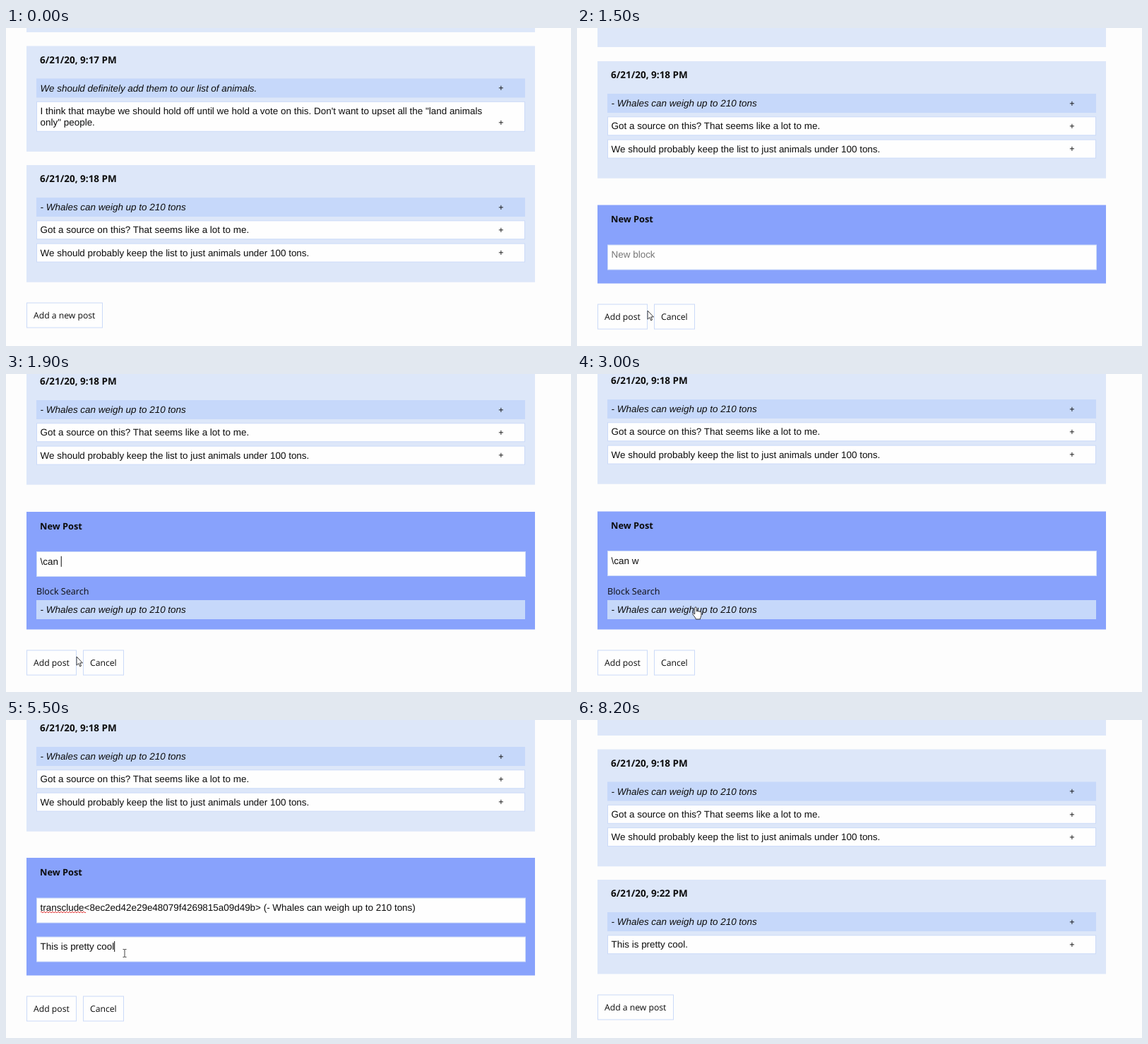
An HTML page for the animation above (8300 ms loop, 800x450 px).

```html
<!DOCTYPE html>
<html lang="en">
<head>
<meta charset="utf-8">
<title>Adding a post</title>
<style>
  html, body { margin: 0; width: 100%; height: 100%; overflow: hidden; background: #fdfdfd; }
  svg { display: block; width: 800px; height: 450px; }
  text { white-space: pre; text-rendering: geometricPrecision; fill: #0c0c0c; }
  .body { font: 13.44px "Liberation Sans", Arial, sans-serif; }
  .quote { font-style: italic; }
  .hint { fill: #757575; }
  .plus { font: 12.5px "Liberation Sans", Arial, sans-serif; text-anchor: middle; }
  .date { font: bold 13.5px "Open Sans", sans-serif; }
  .head { font: bold 12.8px "Open Sans", sans-serif; }
  .label { font: 12.6px "Open Sans", sans-serif; }
  .btn { font: 12.2px "Open Sans", sans-serif; }
</style>
</head>
<body>
<svg id="stage" viewBox="0 0 800 450"></svg>
<script>
const LOOP = 8300;
const PALE = '#dde7f9', QUOTE = '#c6d8fa', EDGE = '#cbdaf8', BLUE = '#88a2fc';
const stage = document.getElementById('stage');

const rect = (x, y, w, h, fill) =>
  `<rect x="${x}" y="${y}" width="${w}" height="${h}" fill="${fill}"/>`;
const box = (x, y, w, h) =>
  `<rect x="${x + .5}" y="${y + .5}" width="${w - 1}" height="${h - 1}" fill="#fefefe" stroke="${EDGE}"/>`;
const text = (x, y, cls, s) =>
  `<text x="${x}" y="${y}" class="${cls}">${s.replace(/</g, '&lt;')}</text>`;
const button = (x, y, w, s) => box(x, y, w, 36) + text(x + 10, y + 22.4, 'btn', s);
const strip = bottom => rect(29, -9, 720, bottom + 9, PALE);
const quote = (y, s) => rect(43, y, 692, 27, QUOTE) + text(48.6, y + 18, 'body quote', s);

// The first row of a post is quoted; a row may hold several lines.
function post(y, date, rows) {
  let top = y + 46, out = '';
  rows.forEach((lines, i) => {
    const h = 27 + 16 * (lines.length - 1);
    out += i ? box(43, top, 692, h) : quote(top, lines[0]);
    if (i) lines.forEach((s, k) => out += text(48.6, top + 18 + 16 * k, 'body', s));
    out += text(701, top + h - 9.2, 'plus', '+');
    top += h + 5.3;
  });
  return rect(29, y, 720, top - y + 22.8, PALE) + text(48, y + 24.3, 'date', date) + out;
}

const WHALES = '- Whales can weigh up to 210 tons';
const whalePost = y => post(y, '6/21/20, 9:18 PM', [
  [WHALES],
  ['Got a source on this? That seems like a lot to me.'],
  ['We should probably keep the list to just animals under 100 tons.']
]);
const editor = y => rect(29, y, 720, 361.5 - y, BLUE) + text(48, y + 24.5, 'head', 'New Post') +
  button(29, 390.5, 71, 'Add post') + button(109, 390.5, 58, 'Cancel');
const input = y => box(43, y, 693, 36);
const search = text(43, 311.6, 'label', 'Block Search') + quote(320, WHALES);

const wavy = y => {
  let d = `M49 ${y}`;
  for (let x = 49; x < 110; x += 4) d += 'q1 -2 2 0t2 0';
  return `<path d="${d}" fill="none" stroke="#e23b3b"/>`;
};

// start time, baseline of the typed text, picture
const scenes = [
  [0, 0, strip(6) + post(25.5, '6/21/20, 9:17 PM', [
    ['We should definitely add them to our list of animals.'],
    ['I think that maybe we should hold off until we hold a vote on this. Don\'t want to upset all the "land animals',
     'only" people.']
  ]) + whalePost(194) + button(29, 388.5, 108, 'Add a new post')],
  [800, 325, strip(27) + whalePost(47) + editor(250.5) + input(306.5)],
  [1800, 269.8, whalePost(-9) + editor(195) + input(251) + search],
  [2100, 268.8, whalePost(-10) + editor(194.5) + input(250) + search],
  [3200, 325, whalePost(-8) + editor(195) + input(251.5) + input(306.5) +
    text(48.6, 270, 'body', 'transclude<8ec2ed42e29e48079f4269815a09d49b> (' + WHALES + ')') + wavy(272)],
  [6450, 0, strip(22) + whalePost(41.5) +
    post(226, '6/21/20, 9:22 PM', [[WHALES], ['This is pretty cool.']]) +
    button(29, 388.5, 108, 'Add a new post')]
];

const shapes = {
  arrow: '<path d="M0 0V12.2L2.8 9.6L4.7 13.8L6.5 13L4.7 8.9H8.4Z" fill="#fff" stroke="#222" stroke-width=".9"/>',
  hand: '<path transform="translate(-4.8 -.5)" d="M3.5 10V1.7a1.3 1.3 0 0 1 2.6 0V6.5a1.2 1.2 0 0 1 2.3 .3a1.2 1.2 0 0 1 2.3 .5a1.1 1.1 0 0 1 2 .8V12c0 2-1.5 3-1.5 5.5H5.2C4.5 14.5 1 12 .5 9.8c0-1.3 1.6-1.4 3 .7z" fill="#fff" stroke="#222" stroke-width=".9"/>',
  beam: '<path d="M-2.5 -5.5H-.8L0 -5L.8 -5.5H2.5M0 -5V5M-2.5 5.5H-.8L0 5L.8 5.5H2.5" fill="none" stroke="#333" stroke-width=".9"/>'
};

stage.innerHTML = rect(0, 0, 800, 450, '#fdfdfd') +
  scenes.map(s => `<g class="scene">${s[2]}</g>`).join('') +
  '<text id="typed" x="48.6" class="body"></text>' +
  '<rect id="caret" width="1" height="15" fill="#111"/>' +
  Object.keys(shapes).map(k => `<g id="${k}">${shapes[k]}</g>`).join('');

const el = id => document.getElementById(id);
const show = (node, on) => node.style.display = on ? '' : 'none';
const groups = [...stage.querySelectorAll('.scene')];
const typed = el('typed'), caret = el('caret');

const COOL = 'This is pretty cool.';
const keys = [[800, ''], [1560, '\\'], [1650, '\\c'], [1700, '\\ca'], [1800, '\\can'],
  [1900, '\\can '], [2100, '\\can w'], [3200, '']];
for (let i = 1; i < COOL.length; i++) keys.push([3650 + 95 * i, COOL.slice(0, i)]);
keys.push([5600, COOL]);

// time, x, y
const path = [[100, 330, 330], [700, 100, 400], [2200, 100, 400], [2800, 168, 330],
  [5700, 168, 330], [6250, 62, 419], [7000, 62, 419]];

const last = (list, t) => list.reduce((n, item, i) => item[0] <= t ? i : n, -1);
const ease = p => p * p * (3 - 2 * p);

function pointer(t) {
  const i = last(path, t);
  if (i < 0 || i === path.length - 1) return null;
  const [t0, x0, y0] = path[i], [t1, x1, y1] = path[i + 1];
  const p = ease((t - t0) / (t1 - t0));
  return [x0 + (x1 - x0) * p, y0 + (y1 - y0) * p];
}

function shapeAt(n, x, y) {
  const inside = (l, top, r, b) => x > l && x < r && y > top && y < b;
  if (n === 0 || n === 5) return inside(29, 388, 137, 425) ? 'hand' : 'arrow';
  if (inside(29, 390, 99, 427) && n > 1) return 'hand';
  if ((n === 2 || n === 3) && inside(43, 320, 735, 347)) return 'hand';
  return (n === 1 || n === 4) && inside(43, 306, 736, 342) ? 'beam' : 'arrow';
}

function draw(t) {
  const n = last(scenes, t), base = scenes[n][1];
  groups.forEach((g, i) => show(g, i === n));

  show(typed, base);
  let caretOn = false;
  if (base) {
    const [since, s] = keys[last(keys, t)];
    typed.textContent = s || 'New block';
    typed.setAttribute('class', s ? 'body' : 'body hint');
    typed.setAttribute('y', base);
    caretOn = (t - since) % 1060 < 530;
    caret.setAttribute('x', 48.6 + (s ? typed.getComputedTextLength() : 0));
    caret.setAttribute('y', base - 12);
  }
  show(caret, caretOn);

  const at = pointer(t), kind = at && shapeAt(n, ...at);
  for (const k in shapes) {
    show(el(k), k === kind);
    if (k === kind) el(k).setAttribute('transform', `translate(${at[0]} ${at[1]})`);
  }
}

function tick() {
  draw(performance.now() % LOOP);
  requestAnimationFrame(tick);
}
tick();
</script>
</body>
</html>
```
